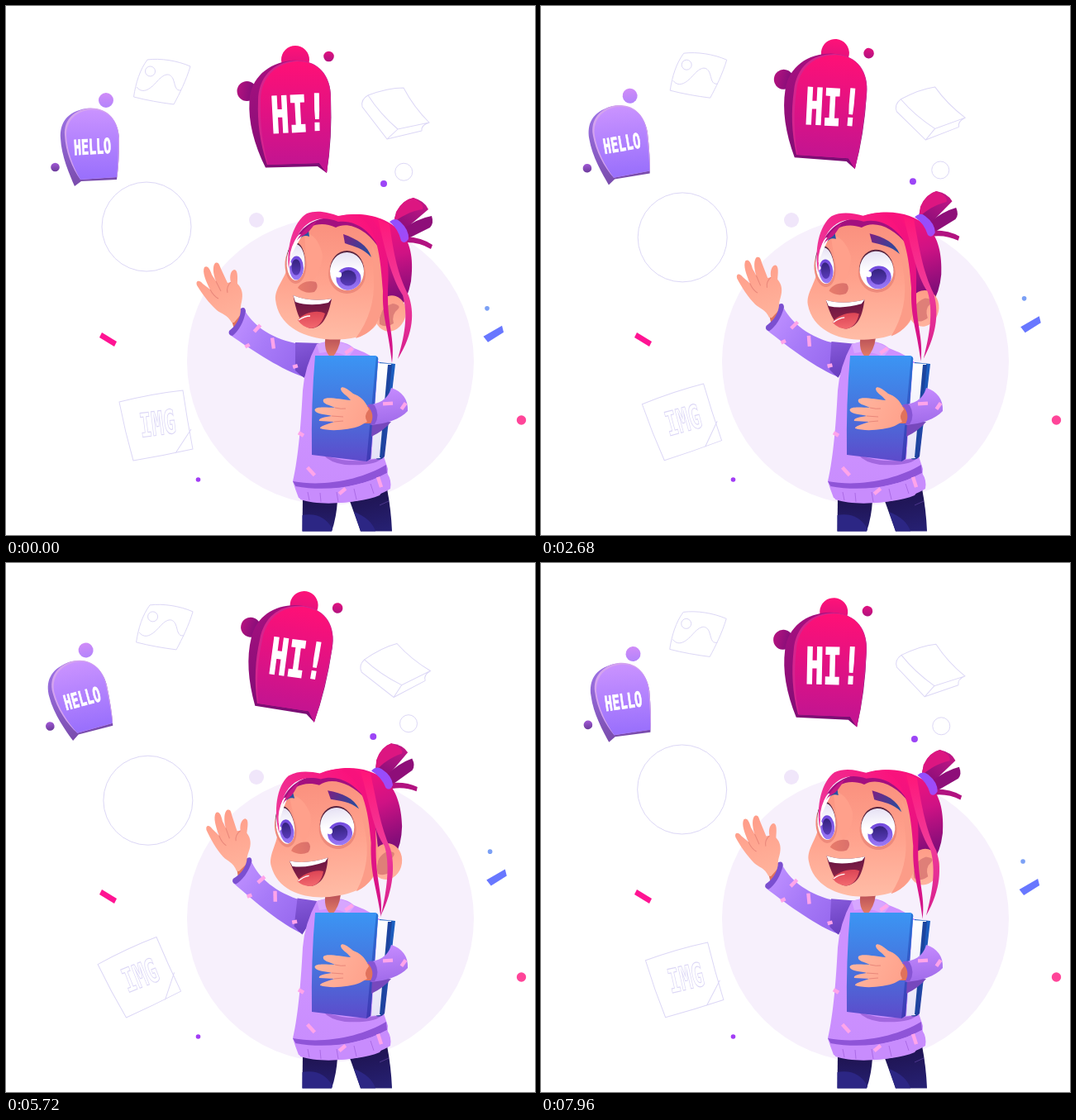
An HTML page with a canvas that plays this animation: 640 by 640 pixels, repeating every 8 s.

```html
<!DOCTYPE html>
<html lang="en">
<head>
<meta charset="utf-8">
<title>Waving student</title>
<style>
html, body { margin: 0; width: 100%; height: 100%; overflow: hidden; background: #fff; }
canvas { display: block; width: 640px; height: 640px; }
</style>
</head>
<body>
<canvas id="stage"></canvas>
<script>
const LOOP = 8000, SWING = 10000;
const FONT = '"DejaVu Sans Mono", "Noto Sans Mono", monospace';
const LINE = '#dcd7f6', FLECK = '#ffa4ea';
const canvas = document.getElementById('stage');
const ctx = canvas.getContext('2d');
const dpr = window.devicePixelRatio || 1;
canvas.width = canvas.height = 640 * dpr;

// Swing from 0 to 1 and back, reaching 1 at time `peak`.
const swing = (t, peak) => 0.5 + 0.5 * Math.cos(2 * Math.PI * (t - peak) / SWING);

function grad(x0, y0, x1, y1, ...cols) {
  const g = ctx.createLinearGradient(x0, y0, x1, y1);
  cols.forEach((c, i) => g.addColorStop(i / (cols.length - 1), c));
  return g;
}
function fill(d, color) {
  ctx.fillStyle = color;
  ctx.fill(new Path2D(d));
}
function line(d, color = LINE, width = 1) {
  ctx.strokeStyle = color;
  ctx.lineWidth = width;
  ctx.stroke(new Path2D(d));
}
function oval(x, y, rx, ry, color, tilt = 0) {
  ctx.beginPath();
  ctx.ellipse(x, y, rx, ry, tilt, 0, 7);
  ctx.fillStyle = color;
  ctx.fill();
}
const dot = (x, y, r, color) => oval(x, y, r, r, color);
function ring(x, y, r) {
  ctx.beginPath();
  ctx.arc(x, y, r, 0, 7);
  ctx.strokeStyle = LINE;
  ctx.lineWidth = 1;
  ctx.stroke();
}
// Draw a group turned by `deg` about (px, py), moved by (dx, dy) and squashed to `sy`.
function group(px, py, deg, dx, dy, draw, sy = 1) {
  ctx.save();
  ctx.translate(px + dx, py + dy);
  ctx.rotate(deg * Math.PI / 180);
  ctx.scale(1, sy);
  ctx.translate(-px, -py);
  draw();
  ctx.restore();
}
function label(str, x, y, size, deg, outline) {
  ctx.save();
  ctx.translate(x, y);
  ctx.rotate(deg * Math.PI / 180);
  ctx.scale(0.6, 1);
  ctx.font = `bold ${size}px ${FONT}`;
  ctx.textAlign = 'center';
  ctx.strokeStyle = outline ? LINE : '#fff';
  ctx.lineWidth = outline ? 1.2 : size / 28;
  ctx.strokeText(str, 0, 0);
  if (!outline) {
    ctx.fillStyle = '#fff';
    ctx.fillText(str, 0, 0);
  }
  ctx.restore();
}
function fleck(x, y, deg, len = 11) {
  group(x, y, deg, 0, 0, () => {
    ctx.fillStyle = FLECK;
    ctx.fillRect(x - len / 2, y - 2.2, len, 4.4);
  });
}

function backdrop() {
  dot(392.5, 430, 173.5, '#f7f0fc');
  dot(303, 259, 9, '#f0e6fa');
  fill('M116 395L134 406L131 412L113 401Z', '#ff1493');
  dot(232.5, 573, 2.8, '#a23df5');
  dot(623.5, 501, 5.7, '#ff4599');
}

function outlines(t) {
  const p = swing(t, 5080);
  const big = swing(t, 4880);
  ring(170 + 2 * big, 267 + 21.7 * big, 54);
  const small = swing(t, 5600);
  ring(481 + 6 * small, 201 - 6.8 * small, 10.5);

  group(0, 0, 0, 3.2 * p, -14.7 * p, () => {
    line('M171 65C187 63 207 66 223 73C218 90 210 106 203 119C187 117 170 114 154.500 110C157 93 162 77 171 65Z');
    line('M158 98C166 108 176 99 183 91C191 82 198 80 202 88C205 95 204 103 212 102');
    ring(174.5, 79, 6);
  });
  group(471, 130, -15 * p, 0, 0, () => {
    line('M438 108Q462 99 481 99Q493 122 512 141L474 149Q452 130 438 108ZM438 108Q429 113 431 122L461 161L474 149M461 161L503 151M512 141Q502 144 503 151');
  });
  group(149.5, 583, -15.3 * p, 0, 0, () => {
    line('M137 479Q177 469 214 465Q219 500 226 536Q190 544 154 550Q144 515 137 479ZM224 512L205 541');
    label('IMG', 185, 519, 40, -7, true);
  });
}

function bits(t) {
  const p = swing(t, 5080), q = swing(t, 4700);
  dot(457 - 13.3 * p, 215 - 5.3 * p, 4, '#9c45f6');
  dot(582 + 4 * q, 366 - 18.7 * q, 2.8, '#7ba0f5');
  group(0, 0, 0, 4.2 * q, -18.3 * q, () => fill('M577.500 400L600 387L602 395L583 407Z', '#6877ff'));
}

function helloBubble(p) {
  group(83, 218, -12.5 * p, -2 * p, -3 * p, () => {
    dot(121, 114, 9, grad(121, 105, 121, 123, '#d08cf8', '#b384fb'));
    dot(59.5, 195, 5.3, grad(59, 190, 59, 200, '#a058d4', '#6d3c9c'));
    fill('M66 160C65 142 73 128 97 124C124 122 136 140 137 160Q137 190 134 210L91 212L83 218C77 204 67 182 66 160Z',
      grad(66, 130, 90, 215, '#9c72e4', '#7a4cad'));
    fill('M71 156C70 137 83 125 102 123.500C125 123 136 140 137 160Q137 190 134.500 207L90 210C80 196 72 176 71 156Z', '#d4a3ef');
    fill('M73 156C73 138 86 126 104 125.500C126 125 136 142 136 160Q136 188 134 207L90 210C81 194 74 176 73 156Z',
      grad(105, 125, 105, 207, '#ca93ff', '#9a70fc'));
    label('HELLO', 105, 179, 25, -3);
  });
}

function hiBubble(p) {
  group(352, 131, 11 * p, -1.6 * p, -15.3 * p, () => {
    dot(350, 65, 17, grad(350, 48, 350, 80, '#ff1278', '#d9127f'));
    dot(291.5, 103, 12, grad(280, 100, 303, 104, '#b3127f', '#7d0d78'));
    dot(390.5, 61, 6.3, grad(390, 55, 390, 67, '#e01280', '#b3127f'));
    fill('M294.500 115C296 87 317 69 345 66C376 64 393 84 393 110Q395 160 388 202L377 194L314 195.500C300 167 293 140 294.500 115Z',
      grad(295, 80, 350, 200, '#a5107f', '#7b0d74'));
    fill('M305 115C305 86 323 68 350 66C378 65 393 84 393 110Q394 160 388 202L379 190L316 192C307 165 304 140 305 115Z', '#d5248e');
    fill('M308 115C308 87 326 69 352 67C379 66 392 86 392 110Q393 160 388 202L379 190L317 192C310 165 307 140 308 115Z',
      grad(350, 67, 350, 190, '#ff1076', '#c41490'));
    label('HI', 343.5, 152.5, 60, -3);
    label('!', 376.5, 150, 60, -1);
  });
}

function arm(p) {
  group(365, 428, 7 * p, 0, 0, () => {
    fill('M271 373L285 366L288 374L276 391Z', '#e0735c');
    fill('M273 383C268 373 261 373 255 368C246 360 237 348 231 338C229 332 234 331 238 336L247 343C242 333 237 322 240 316C244 313 247 319 249 325L254 333C250 323 250 314 253 311C258 309 258 314 261 320L268 335L272 334C270 327 272 320 276 319C281 319 280 330 280 336C286 342 287 349 285 358C283 366 284 369 285 372L276 383Z',
      grad(250, 315, 275, 385, '#ff9d89', '#ffb49d'));
    line('M247 343Q251 351 257 354M254 333L260 345M272 334Q266 340 268 347', '#e9877a', 1);
    fill('M288 367C298 385 318 401 350 408L380 409L361 449C335 441 300 418 271 398C278 391 286 380 288 367Z',
      grad(280, 380, 352, 425, '#bd8eff', '#a87bf8', '#9a6cf0'));
    fill('M350 407L381 408L361 450Q355 446 350 441Z', grad(352, 410, 365, 445, '#8558d9', '#6a40c0'));
    fill('M284 366Q289 363 290 369C288 382 281 394 274 399Q268 398 270 393C279 386 284 377 284 366Z', '#7b4fd0');
    fleck(304, 390, -48);
    fleck(323, 408, 82, 13);
    fleck(292, 411, -28, 6);
    fleck(350, 436, -18, 6);
  });
}

function body() {
  fill('M359 595L401 598Q400 618 394 635.500L358.500 635.500Z', grad(370, 598, 370, 636, '#1f1452', '#262072'));
  fill('M358.500 616Q384 612 395 633L394 635.500L358.500 635.500Z', '#2c2684');
  fill('M416 599L461 584Q466 610 467 635.500L429 635.500Z', grad(440, 590, 450, 636, '#1f1452', '#262072'));
  fill('M421 612Q442 620 447 635.500L429 635.500Z', '#2c2684');
  line('M452 604L463 599', '#583e99', 0.8);

  fill('M376 409C392 404 410 404 421 414C445 423 458 432 464 450L457 545L462 560Q461 582 452 592C425 603 375 604 354 595Q350 585 347 575C354 545 357 502 359 465Q361 437 376 409Z',
    grad(400, 408, 390, 600, '#cd90ff', '#cd92ff', '#c88cfd'));
  fill('M384 543Q420 556 456 546Q448 557 410 555Q391 552 384 543Z', '#a267df');
  fill('M347 575C385 582 430 573 460 555L461 565C430 582 386 589 351 582Z', '#8f54d8');
  fill('M350 581C388 588 430 582 461 565Q467 574 465 584C436 602 382 606 356 597Z', '#c88cfd');
  line('M365 588L367 598M380 589L381 600M400 588L402 600M421 584L424 597M441 578L445 590', '#ab6be6', 1);
  fill('M376 409Q401 400 422 415L414 425Q400 416 379 420Z', '#d7a6ff');
  fill('M387 398L405 401Q403 417 394 426Q383 418 387 398Z', grad(395, 401, 395, 423, '#b95057', '#e17b67'));
  fleck(415, 417, -35);
  fleck(369, 563, 48, 13);
  fleck(452, 576, 72, 13);
  fleck(357, 518, 30, 7);
  fleck(407, 587, -40, 10);
}

function book() {
  fill('M452 431L471 433L458 545Q454 550 448 548Z', grad(460, 432, 450, 548, '#1b60c2', '#243d9c'));
  fill('M450 432L466 433L453 547L442 548Z', grad(450, 432, 450, 548, '#ffffff', '#e5e2f7'));
  fill('M462 434L467 434L455 546L452 546Z', '#1c459f');
  fill('M374 423L447 423Q451 424 450 429L441 548L436 551L370 543Q369 480 374 423Z',
    grad(405, 423, 405, 550, '#3b95f4', '#4675de', '#5d4bcb'));
  fill('M448 424Q451 425 450 429L441 548L436 551Z', grad(445, 424, 440, 550, '#2874d6', '#4038b4'));

  fill('M443 504L466 503Q457 514 442 521Z', '#7748bd');
  fill('M431 486L445 484L446 505L434 505Z', '#e1725c');
  fill('M439 488C434 476 428 472 420 469C412 462 406 459 405 463C405 468 413 471 417 477C404 476 388 472 384 476C382 482 393 483 398 486C388 486 374 484 373.500 489C375 494 388 494 394 496C386 497 377 499 379 502L397 503C390 506 379 508 380 511C392 515 415 513 428 508L437 503Q432 496 439 488Z',
    grad(375, 475, 435, 505, '#ffb7a0', '#ffa28c'));
  line('M398 486Q406 488 411 487M394 496L408 497M397 503L408 502', '#e9877a', 1);
  fill('M437 483C451 481 462 477 466 462C479 466 487 476 486 490C477 500 461 505 442 507C448 498 446 489 437 483Z',
    grad(460, 462, 465, 506, '#c68bff', '#a06bea'));
  fill('M437 483Q442 480 446 483Q453 496 446 506L440 507Q448 495 437 483Z', '#8755d4');
  fleck(462, 481, -4, 12);
  fleck(481, 484, -55, 9);
}

function eye(x, y, rx, ry, ix, iy, irx, iry) {
  oval(x, y + 3, rx + 2, ry + 1, '#ee8a7b');
  oval(x, y - 2, rx, ry, '#58243f');
  oval(x, y, rx, ry, grad(x, y - ry, x, y + ry, '#e6e1f4', '#ffffff', '#ffffff'));
  ctx.save();
  ctx.beginPath();
  ctx.ellipse(x, y, rx, ry, 0, 0, 7);
  ctx.clip();
  oval(ix, iy, irx, iry, grad(ix, iy - iry, ix, iy + iry, '#7047dc', '#9b7af5'));
  oval(ix - 0.5, iy - 1, irx * 0.66, iry * 0.68, grad(ix, iy - 9, ix, iy + 9, '#372482', '#5b3cbc'));
  ctx.restore();
}

function mouth() {
  fill('M347.500 350C361 356 378 357 394 354C390 374 384 389 369 390C357 389 351 370 347.500 350Z',
    grad(370, 352, 370, 390, '#641342', '#9a2948'));
  fill('M347.500 350C361 356 378 357 394 354L390 359Q367 364 350 358Z', '#fff');
  fill('M353 380C359 371 377 367 386 372Q381 389 369 390Q359 389 353 380Z', grad(370, 370, 370, 390, '#dc4555', '#f3696f'));
  line('M354 380Q361 375 368 375', '#fff', 1.4);
}

function head(p) {
  const bun = grad(500, 235, 475, 268, '#c01684', '#8a0e79');
  fill('M469 262C472 244 481 235 493 232Q507 236 511 246L484 269Z', bun);
  fill('M469 262C477 255 490 248 504 246Q507 240 493 232Q480 234 472 249Z', '#dc1681');
  fill('M480 270Q498 257 515 254Q518 263 513 268L487 281Z', '#8e0e79');
  fill('M484 279Q503 280 516 289L514 294Q501 286 485 286Z', '#b11280');
  fill('M400 255C430 247 462 255 478 274C491 287 493 311 490 333Q486 355 475 368L453 362L430 290Z',
    grad(455, 255, 478, 350, '#f8127c', '#cf1284', '#840d79'));
  fill('M464 261Q471 255 477 261Q488 271 487 282Q482 289 478 284Q475 270 464 261Z', grad(465, 258, 487, 285, '#8f50ff', '#a548f6'));

  oval(465, 372, 18.5, 22, grad(465, 350, 465, 395, '#ff9c87', '#ffb49e'), 0.3);
  fill('M452 385Q450 365 468 360Q479 362 474 367Q466 373 469 384Q460 390 452 385Z', '#df7f78');

  fill('M350 286C358 266 376 260 400 260C432 260 449 278 455 306C461 336 457 368 449 384C437 402 412 405 385 403C358 400 329 386 326 355C325 341 338 330 341 314Q344 297 350 286Z',
    grad(390, 262, 380, 402, '#fa907e', '#ffa28d', '#ffbca6'));
  fill('M443 290Q461 325 456 366Q448 395 423 402Q447 370 445 330Z', '#fc9c88');
  fill('M361 274Q377 276 383 301Q382 322 369 334Q362 305 361 274Z', '#ffa08b');

  eye(350.5, 310, 11, 22, 351.5, 317, 8.5, 14.5);
  eye(412.500, 321, 20.5, 23, 414.500, 330, 15, 14);
  dot(343, 312, 2.6, '#fff');
  dot(402.5, 325, 3.6, '#fff');

  fill('M355 282Q359 271 366 271L367 279Q360 276 355 282Z', '#2853a2');
  fill('M408 276C425 282 438 290 442 304C432 293 421 291 410 287Z', grad(408, 279, 442, 302, '#792284', '#214f9e'));
  fill('M353 341C356 335 366 331 375 334Q379 340 373 346Q362 349 353 341Z', grad(355, 340, 378, 338, '#e77b6b', '#d96f6b'));
  group(370, 390, 0, 1.5 * p, -3 * p, mouth, 1 - 0.15 * p);

  fill('M352 279C362 262 383 253 402 257C426 253 444 267 452 294C437 270 414 260 399 268C382 260 366 265 358 276Z', '#a30f7f');
  fill('M342 318C339 290 348 261 364 251C377 246 391 250 402 254C424 249 447 253 463 266L453 296C443 274 424 258 402 261C382 253 366 258 355 274Q344 291 342 318Z',
    grad(345, 300, 430, 250, '#ed3699', '#fa127c'));
  fill('M343 306Q344 290 354 277Q357 275 358 278Q350 291 343 306Z', '#fff');
  fill('M349 288Q360 268 376 260Q366 275 361 277Q353 280 349 288Z', '#c51786');
}

// Loose locks: a start point, then four cubic segments, in both end poses.
const LOCKS = [
  {
    from: [425, 254, 450, 266, 453, 305, 456, 345, 455, 378, 462, 386, 467, 432, 471, 403, 461, 385, 462, 345, 464, 310, 462, 278, 440, 254],
    to: [404, 250, 430, 262, 438, 298, 441, 338, 440, 378, 447, 388, 453, 428, 456, 400, 446, 385, 447, 340, 447, 305, 443, 273, 420, 249],
    cols: ['#f8127c', '#d0148b']
  },
  {
    from: [450, 258, 460, 300, 466, 328, 480, 350, 487, 375, 482, 400, 474, 427, 494, 395, 494, 370, 487, 350, 474, 325, 469, 300, 464, 264],
    to: [428, 251, 439, 290, 444, 325, 457, 342, 464, 365, 460, 395, 453, 426, 468, 395, 470, 365, 464, 345, 452, 318, 448, 290, 440, 254],
    cols: ['#ff1679', '#f03b9a', '#d51c8c']
  }
];
function locks(p) {
  for (const { from, to, cols } of LOCKS) {
    const v = from.map((a, i) => a + (to[i] - a) * p);
    ctx.beginPath();
    ctx.moveTo(v[0], v[1]);
    for (let i = 2; i < v.length; i += 6) ctx.bezierCurveTo(...v.slice(i, i + 6));
    ctx.closePath();
    ctx.fillStyle = grad(0, 255, 0, 430, ...cols);
    ctx.fill();
  }
}

function draw(t) {
  const p = swing(t, 5080);
  ctx.setTransform(dpr, 0, 0, dpr, 0, 0);
  ctx.fillStyle = '#fff';
  ctx.fillRect(0, 0, 640, 640);
  backdrop();
  outlines(t);
  bits(t);
  helloBubble(p);
  hiBubble(p);
  arm(p);
  body();
  book();
  group(394, 394, -9.5 * p, 0, 0, () => head(p));
  locks(p);
}

function tick(now) {
  draw(now % LOOP);
  requestAnimationFrame(tick);
}
draw(0);
requestAnimationFrame(tick);
</script>
</body>
</html>
```
